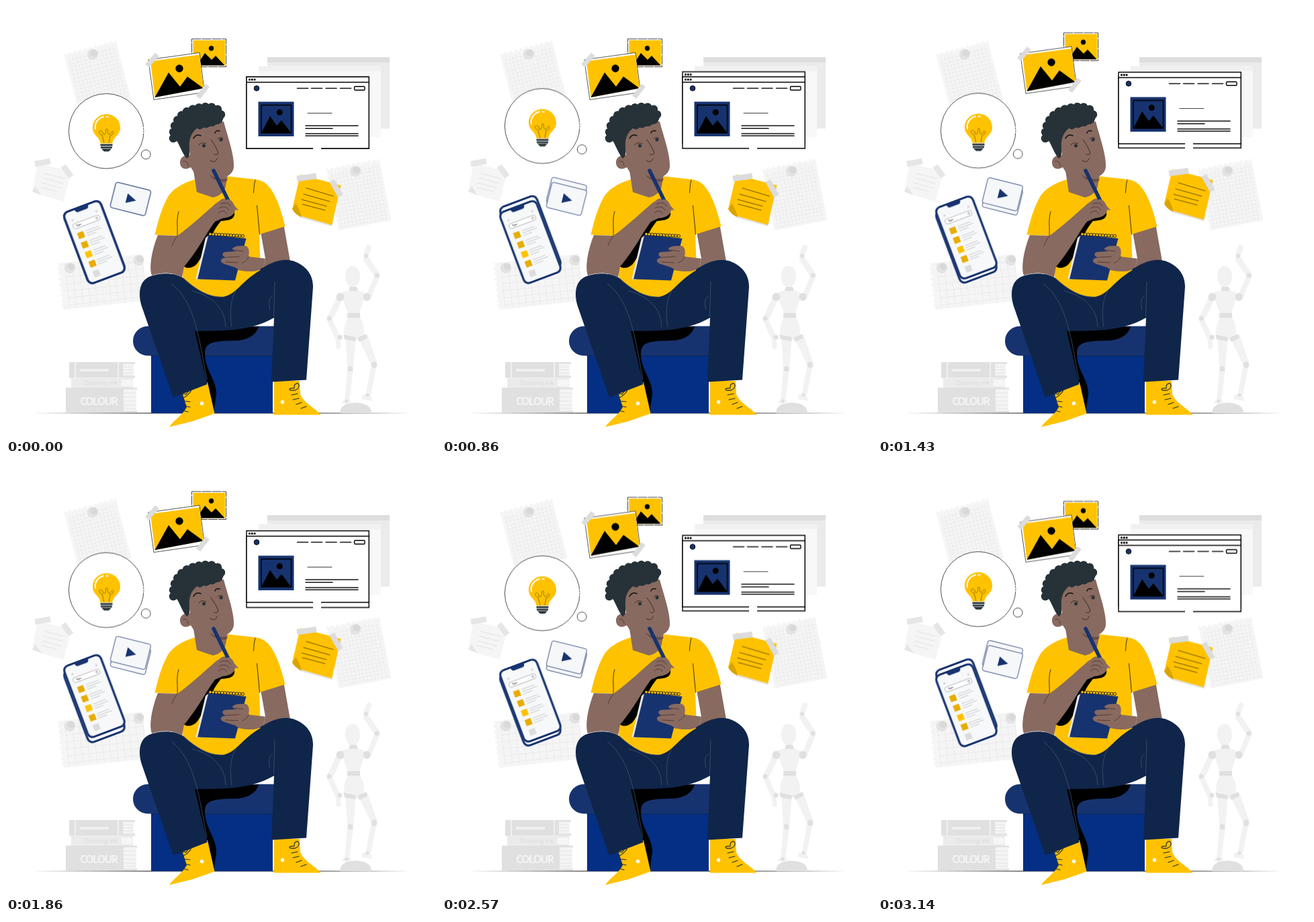
These frames come from a looping animation (640x640 px, 3210 ms). An HTML page:

```html
<!DOCTYPE html>
<html lang="en">
<head>
<meta charset="utf-8">
<title>Thinking it over</title>
<style>
html, body { margin: 0; width: 100%; height: 100%; overflow: hidden; background: #fff; }
svg { display: block; width: 100vw; height: 100vh; }

/* Two floating layers: the second starts a quarter of the loop later. */
.lead, .late { --up: -7.7px; --down: 7.2px; animation: lead 3.21s ease-in-out infinite; }
.late { --down: 7.7px; animation-name: late; }
.photos { --up: -10.2px; --down: 6.6px; }
.memo { --up: -8.7px; --down: 6.5px; }
.bubble { --down: 6.8px; }
@keyframes lead {
  0%, 50%, 100% { transform: translateY(0); }
  25% { transform: translateY(var(--up)); }
  75% { transform: translateY(var(--down)); }
}
@keyframes late {
  0%, 25%, 75% { transform: translateY(0); }
  50% { transform: translateY(var(--up)); }
  100% { transform: translateY(var(--down)); }
}

.line { fill: none; stroke: #111; stroke-width: .8; stroke-linecap: round; }
.bold { stroke-width: 1.5; }
.lace { stroke: #263238; stroke-width: 1.2; }
.crease { stroke: #4b3029; }
.faint { fill: none; stroke: #dedede; stroke-width: .8; }
.tape { fill: none; stroke: #dcdcdc; stroke-width: 8.5; }
.torn { fill: none; stroke: #fff; stroke-width: 5; stroke-linecap: round; stroke-dasharray: 0 8; }
.paper { fill: #f5f5f5; }
.pale { fill: #f2f2f2; }
.grey { fill: #e0e0e0; }
.yellow { fill: #ffc200; }
.skin { fill: #886a60; }
.navy { fill: #17336f; }
.pants { fill: #10254a; }
.hair { fill: #263238; }
.seam { fill: none; stroke: #44546f; stroke-width: .8; }
.limb { fill: none; stroke: #f2f2f2; stroke-linecap: round; }
.rings { fill: none; stroke-linecap: round; stroke-dasharray: 0 4.4; }
</style>
</head>
<body>
<svg viewBox="0 0 640 640">
<defs>
  <pattern id="fine" width="5.6" height="5.6" patternUnits="userSpaceOnUse">
    <path d="M0 0H5.6M0 0V5.6" fill="none" stroke="#e5e5e5"/>
  </pattern>
  <pattern id="wide" width="10.5" height="10.5" patternUnits="userSpaceOnUse">
    <path d="M0 0H10.5M0 0V10.5" fill="none" stroke="#e6e6e6" stroke-width="1.2"/>
  </pattern>
  <g id="pin">
    <circle r="8" fill="#e3e3e3"/>
    <ellipse cx="2" cy="-2" rx="5.5" ry="5" fill="#d9d9d9"/>
  </g>
  <g id="window">
    <path d="M358 105.5H540.2V212H358Z" fill="#fff"/>
    <path d="M457 212H358V105.5H540.2V212H469M358 113.5H540.2" fill="none" stroke="#000" stroke-width="1.4"/>
    <path d="M362.5 109.5h0M366.3 109.5h0M370.1 109.5h0" stroke="#000" stroke-width="3.2" stroke-linecap="round"/>
  </g>
  <rect id="case" x="-29" y="-56.5" width="58" height="113" rx="7.5" fill="#f7f8fa" stroke="#17336f" stroke-width="3.2"/>
  <rect id="card" x="-26.8" y="-19.3" width="53.6" height="38.6" rx="3" fill="#f6f7f9" stroke="#17336f" stroke-width=".8"/>
</defs>

<!-- Floor and pinned papers -->
<path d="M37 606L210 605.3H430L603 606L430 606.7H210Z" fill="#666"/>
<g transform="translate(86 71) rotate(-14.5)">
  <path class="paper" d="M0 0H80V92H0Z"/>
  <rect x="3" y="7" width="75" height="85" fill="url(#fine)"/>
  <path class="torn" d="M4 0H80"/>
</g>
<use href="#pin" x="129" y="72"/>
<g transform="translate(477 242) rotate(-11)">
  <path class="paper" d="M0 0H80V94H0Z"/>
  <rect x="3" y="7" width="75" height="84" fill="url(#fine)"/>
  <path class="torn" d="M4 0H80"/>
</g>
<use href="#pin" x="520" y="246"/>
<g transform="translate(76 383) rotate(-6.3)">
  <path class="paper" d="M0 0H128V70H0Z"/>
  <rect x="9" y="2" width="118" height="66" fill="url(#wide)"/>
  <path class="torn" d="M0 4V70"/>
</g>
<use href="#pin" x="95" y="390"/>
<use href="#pin" x="197.5" y="378.5"/>
<path class="paper" d="M47 234L97 246L86 291L54 282L39 276Z"/>
<path fill="#e6e6e6" d="M39 276L44 268L53 282Z"/>
<path class="faint" d="M57 249l31 8M55 256l30 8M53 263l29 8M52 270l24 6"/>
<path class="tape" style="stroke:#e6e6e6" d="M43 235L66 231M85 238L97 254"/>

<!-- Books -->
<path class="grey" d="M94 530H192V533H188V550H192V553.5H94Z"/>
<path fill="#f4f4f4" d="M174 532.5H190V551H174Z"/>
<path class="faint" d="M174 537H189M174 541.5H189M174 546H189M174 550H189"/>
<path fill="#f0f0f0" d="M110 540H153V544H110ZM102 530H104V553H102ZM166 530H168V553H166Z"/>
<path fill="#ebebeb" d="M97 554H189V568H97Z"/>
<path fill="#f6f6f6" d="M172 556H188V566H172Z"/>
<text x="116" y="564" font-family="Lato, sans-serif" font-size="9" fill="#dadada" letter-spacing=".3">Drawing ink</text>
<path class="grey" d="M89 568H195V571H192V602H195V605H89Z"/>
<path fill="#f4f4f4" d="M175 570.5H194V602.5H175Z"/>
<path class="faint" d="M175 576H193M175 582H193M175 588H193M175 594H193M175 599H193"/>
<text x="110" y="593.5" font-family="'Noto Sans', sans-serif" font-weight="700" font-size="16" letter-spacing="-1.9" fill="#f3f3f3">COLOUR</text>

<!-- Wooden mannequin -->
<g>
  <path class="grey" d="M497 606C497 594 509 590.5 520 590.5S544 594 544 606Z"/>
  <path class="limb" stroke-width="9" d="M552 400L536 376M497 434L483 463"/>
  <path class="limb" stroke-width="8" d="M540 432L552 403M482 468L494 494M536 370L540 359"/>
  <path class="limb" stroke-width="7" d="M494 494L495 507"/>
  <path class="pale" d="M505 490L521 492L517 539H508ZM523 492L538 489L552 530L545 537ZM508 541H517L511 588L504 587ZM543 538L552 534L543 578L535 580ZM530 579L541 577L546 588L530 585ZM503 586L513 586L514 592L499 591Z"/>
  <path class="pale" d="M515.5 387C523 387 527 393 527 403S521 419 515.5 419S505 412 505 403S508 387 515.5 387ZM498 428C508 421 524 421 535 428L526 458H509ZM509 464H527C533 473 534 485 532 493C522 499 510 499 503 491C503 480 504 472 509 464Z"/>
  <path class="grey" d="M512 418H522L524 424H510ZM508 457H527V464H508Z"/>
  <g class="grey">
    <circle cx="497.5" cy="433" r="6"/><ellipse cx="537" cy="433" rx="5.5" ry="6"/>
    <circle cx="481" cy="465" r="3.5"/><circle cx="552" cy="401" r="3.5"/>
    <circle cx="497" cy="493" r="3.5"/><circle cx="536" cy="372" r="3"/>
    <path d="M502 489L521 493L520 499L504 496ZM523 494L536 488L538 494L526 500Z"/>
    <circle cx="512.5" cy="540" r="4"/><circle cx="548" cy="534" r="4.5"/>
    <circle cx="507" cy="588" r="2.5"/><circle cx="538" cy="579" r="2.5"/>
  </g>
</g>

<!-- Grey windows behind -->
<path fill="#ebebeb" d="M389 76H571V182.5H389Z"/>
<path fill="#dedede" d="M389 76H571V84H389Z"/>
<path fill="#f8f8f8" d="M376 89.5H558V195H376Z"/>
<path fill="#f1f1f1" d="M376 89.5H558V97H376Z"/>

<!-- Browser -->
<use href="#window" class="lead"/>
<g class="late">
  <use href="#window"/>
  <circle cx="373" cy="122.5" r="3.8" fill="#17336f" stroke="#000"/>
  <path class="line bold" d="M433.5 122.5H449.5M454.5 122.5H470.5M476 122.5H492M497.5 122.5H513.5M446 178.2H524M446 182.3H486M446 190H524M446 193.2H524"/>
  <rect x="518.5" y="119.8" width="15.5" height="5.4" rx="1.5" fill="#fff" stroke="#000" stroke-width="1.4"/>
  <path class="line" d="M449 159.5H485"/>
  <path class="navy" d="M375.5 142.5H428.5V194H375.5Z"/>
  <path d="M380 147.5H424.5V189H380Z" fill="none" stroke="#000" stroke-width="1.5"/>
  <path d="M380 189L393 164L403 178L410 170L424.5 189Z"/>
  <circle cx="407.3" cy="158.3" r="4.5"/>
</g>

<!-- Photos -->
<g class="late photos">
  <path d="M276.5 49H327.5V90.5H276.5Z" fill="#fff" stroke="#111" stroke-width=".8" stroke-dasharray="14 1"/>
  <path class="yellow" d="M278.5 51H326V88.5H278.5Z"/>
  <path d="M284 88.5L296 70L306 80L312 74L325.5 88.5Z"/>
  <circle cx="305.5" cy="63" r="3.7"/>
  <path d="M211.8 80L288 69.5L295.5 128.5L220 139.5Z" fill="#fff" stroke="#111" stroke-width=".7"/>
  <path class="yellow" d="M215 82.3L287.5 72.5L294 122L221.5 136Z"/>
  <path d="M221.5 136L242 99L259 120L270 105L294 122.5Z"/>
  <circle cx="258" cy="93" r="5.7"/>
  <path class="tape" style="stroke-width:7.5" d="M210 89L225 72M286 136L300 118"/>
</g>

<!-- Idea bubble -->
<g class="lead bubble">
  <circle cx="149.2" cy="186.2" r="55.8" fill="#fff" stroke="#222" stroke-width=".8"/>
  <circle cx="208.2" cy="221" r="6.9" fill="#fff" stroke="#222" stroke-width=".8"/>
  <path d="M205 180V192" stroke="#fff" stroke-width="1.2" stroke-dasharray="2 2"/>
  <path class="yellow" d="M149.5 161C161 161 170 170 170 181C170 193 159 195 158.5 204.5H140.5C140 195 129 193 129 181C129 170 138 161 149.5 161Z"/>
  <path d="M133 183C131.5 174 137 167 145 165" fill="none" stroke="#fff" stroke-width="2" stroke-linecap="round"/>
  <path d="M149 164.8h3" stroke="#fff" stroke-width="1.8" stroke-linecap="round"/>
  <path d="M146 204L143 192C137 191 138 184 142 186C146 188 143 193 147 191C150 189 147 183 150 183S150 190 153 191S157 185 159 187S160 191 155 193L153 204" fill="none" stroke="#7d6210" stroke-width=".8"/>
  <path class="hair" d="M140.5 205.5H158.5V208.3H140.5ZM141 209.2H158V211.8H141ZM142 212.5H157L153 216.5H146Z"/>
</g>

<!-- Video card -->
<g class="lead"><use href="#card" transform="translate(185.4 287.2) rotate(14)"/></g>
<g class="late"><g transform="translate(185.4 287.2) rotate(14)">
  <use href="#card"/>
  <path class="navy" d="M-6 -7L8.5 .5L-6 7.5Z"/>
</g></g>

<!-- Phone -->
<g class="lead"><use href="#case" transform="translate(131.5 351.5) rotate(-20.6)"/></g>
<g class="late"><g transform="translate(131.5 351.5) rotate(-20.6)">
  <use href="#case"/>
  <path class="navy" d="M-13 -57H13C10 -57 11 -50.5 7 -50.5H-7C-11 -50.5 -10 -57 -13 -57Z"/>
  <path d="M-19 -42h0M19 -42h0" stroke="#d5d5d5" stroke-width="3.5" stroke-linecap="round"/>
  <rect x="-21.5" y="-36" width="42" height="7.6" rx="3" fill="#fff" stroke="#777" stroke-width=".5"/>
  <text x="-17" y="-30.7" font-family="Lato, sans-serif" font-size="4" fill="#222">Type</text>
  <circle cx="16" cy="-32.3" r="1.4" fill="none" stroke="#444" stroke-width=".5"/>
  <g fill="#e8ac00">
    <path d="M-19.5 -21.5h9.500v9.500h-9.500ZM-19.300 -6.200h9.500v9.500h-9.500ZM-18.500 24.300h9.500v9.500h-9.500Z"/>
    <path class="yellow" d="M-18.8 9.1h9.500v9.500h-9.500Z"/>
    <path fill="#dcdcdc" d="M-18 39.8h9.500v9.500h-9.500Z"/>
  </g>
  <path d="M-6 -20H14M-6 -16.5H17M-6 -13H8M-6 -4.7H14M-6 -1.2H17M-6 2.3H8M-6 10.6H14M-6 14.1H17M-6 17.6H8M-6 25.9H14M-6 29.4H17M-6 32.9H8" fill="none" stroke="#aaa" stroke-width=".6"/>
</g></g>

<!-- Yellow memo -->
<g class="late memo">
  <path fill="#e3e3e3" d="M428 304L438 315L485 328L488 318Z"/>
  <path class="yellow" d="M438 251L498.5 267L485 326L440 313L426 302Z"/>
  <path fill="#d9a300" d="M426 302C428 299 430 297 431 294C435 299 438 306 440 314C434 312 429 308 426 302Z"/>
  <path class="line" style="stroke:#4a3a08" d="M447 271L487 283M443 280L482 291M440 288L477 298M441 295L475 304"/>
  <path class="tape" d="M433 257L462 253M485 260L498 283"/>
</g>

<!-- Stool -->
<path fill="#042f84" d="M216 520H397V606H216Z"/>
<path class="navy" d="M211 476.5H420V520.5H211A22 22 0 0 1 211 476.5Z"/>
<path class="line" style="stroke:#10254a" d="M216 520.8H397"/>
<path d="M279 482L376 477C372 491 358 498 340 498C312 499 296 499 296 517C296 545 318 560 312 585L309 606H297L299 560L284 500Z"/>

<!-- Trousers and shoes -->
<path class="yellow" d="M262 575L300 560L310.5 606.5L278 618L243 626.5C248 618 262 610 269 597Z"/>
<path class="yellow" d="M399 558H437L438 578C444 592 460 598 468.5 608.5L399 608.5Z"/>
<g class="line lace">
  <path d="M262 602l9 2M265 595l9 2M265 588l9 1M266 582C257 586 262 574 268 578C272 571 279 570 273 576C270 580 268 581 266 582"/>
  <path d="M425 579l9 -2M427 586l9 -2M432 593l8 -3M439 599l8 -3M430 572C420 573 419 568 429 569C428 561 437 559 436 566C435 571 431 571 430 572"/>
</g>
<circle cx="291.5" cy="591.5" r="2.7" fill="#fff"/><circle cx="411.5" cy="589.5" r="2.7" fill="#fff"/>
<path class="pants" d="M264 405C250 396 228 397 213 403C197 411 197 430 202 447L249 582.5L299.5 563L281 484C318 483 360 486 399 464L395 559.5L447 556.5L457 418C457 398 445 386 429 380C410 374 394 382 378 392L340 405Z"/>

<!-- Shirt over the right upper arm -->
<path class="skin" d="M377 325L412 318L423 380C412 375 396 382 383 390L386 376Z"/>
<path class="yellow" d="M280 258.5C265 263 247 272 240 286C231 302 226 322 221.5 340.5L255 342L262 350L263 404C284 424 304 434 323 433C344 429 348 411 379 393L377 340L415.5 328C410 305 402 282 393 271C386 261 378 259 371 258L326 253Z"/>
<path class="line" d="M371 259C369 266 369 272 368.5 278M373.5 297L377.5 340M257 306C253 318 256 330 255 341"/>
<path class="seam" d="M246 413C282 440 288 500 299 556M277 424C308 432 326 450 327 478M344 421C333 436 333 458 336 478M400 410L398.5 462M397 431C390 436 391 444 393 452M264 405C284 424 304 434 323 433"/>

<!-- Head -->
<path class="skin" d="M277 232L330 250L327 268C326 276 318 283 308 285L284 277Z"/>
<path fill="#6b4d45" d="M302 250C308 256 320 259 330 257L328 261C318 263 308 259 302 250Z"/>
<path class="skin" d="M274 222C266 221 258 226 259 234C260 242 267 245 275 240L280 248L304 250C316 260 337 256 339 240C340 222 331 198 324 172L285 172L270 196Z"/>
<path class="line crease" d="M264 231C268 230 271 233 271 238"/>
<path class="hair" d="M249 196C246 172 262 156 280 153C300 146 318 150 323 162C326 170 318 177 308 177C299 183 290 180 284 182C275 190 272 198 273 212C273 219 274 224 269 227C263 220 260 211 255 202Z"/>
<path d="M249 197C247 172 262 157 280 153C300 147 318 150 320 161C321 170 310 172 304 174L286 178" fill="none" stroke="#263238" stroke-width="12.5" stroke-linecap="round" stroke-dasharray="0 9.5"/>
<circle cx="294.5" cy="208" r="2.5" class="hair"/><circle cx="320" cy="199" r="2.5" class="hair"/>
<path class="line bold" d="M279 197C282 192 286 191 290 193M311 189C312 186 315 185 318 186"/>
<path class="line" style="stroke:#2b1d19" d="M287 207C290 203 294 203 298 205M315 198C317 195 320 195 323 197M305 199C310 206 314 212 316 219C315 222 312 221 310 221M304 230C308 233 313 232 314 227"/>

<!-- Arms, pencil and notebook -->
<path d="M264 387L306 325L330 296C338 300 341 305 340 311C338 319 329 319 320 320C304 338 298 366 284 384C278 390 270 392 264 387Z"/>
<path class="skin" d="M226 341L255 342C271 331 295 309 312 294L318 290C324 284 331 287 334 291L341 301C342 310 334 315 322 316L311 321C298 338 287 362 265 388L262 404C249 396 232 396 217 401C212 386 219 358 226 341Z"/>
<path class="skin" d="M386 376L383 390C372 397 356 395 345 393L355 374Z"/>
<path class="pants" d="M378 392C394 382 410 374 429 380L430 395L380 398Z"/>
<path d="M297 345L302 341L288 408L282.500 406Z" fill="#e8e8e8"/>
<path class="navy" d="M301.5 340L357.5 346L341 408.5L285 406.5Z"/>
<path class="rings" stroke="#222" stroke-width="5" d="M304 339.5L356 342.5"/>
<path class="rings" stroke="#ffc200" stroke-width="3.4" d="M304 339.5L356 342.5"/>
<path class="skin" d="M337 361C341 356 351 357 357 357C363 360 362 368 361 373L386 376L374 394C360 396 349 395 341 389C330 385 321 384 320 380C319 376 324 375 328 374C321 373 320 367 327 366L345 365C341 365 337 364 337 361Z"/>
<path class="line crease" d="M328 374L347 373M327 381L345 382M338 363L353 365M361 373C360 377 356 381 352 382M255 342C251 347 249 352 247 357"/>
<path d="M309 245L331 290" fill="none" stroke="#17336f" stroke-width="5.5" stroke-linecap="round"/>
<path class="skin" d="M312 300C313 293 321 287 327 289C333 285 338 292 340 297L346 304L337 303L331 313L317 316Z"/>
<path class="line crease" d="M319 295C325 291 332 293 334 298M317 301C323 297 330 299 332 304M316 308C322 303 327 305 328 309"/>
</svg>
</body>
</html>
```
